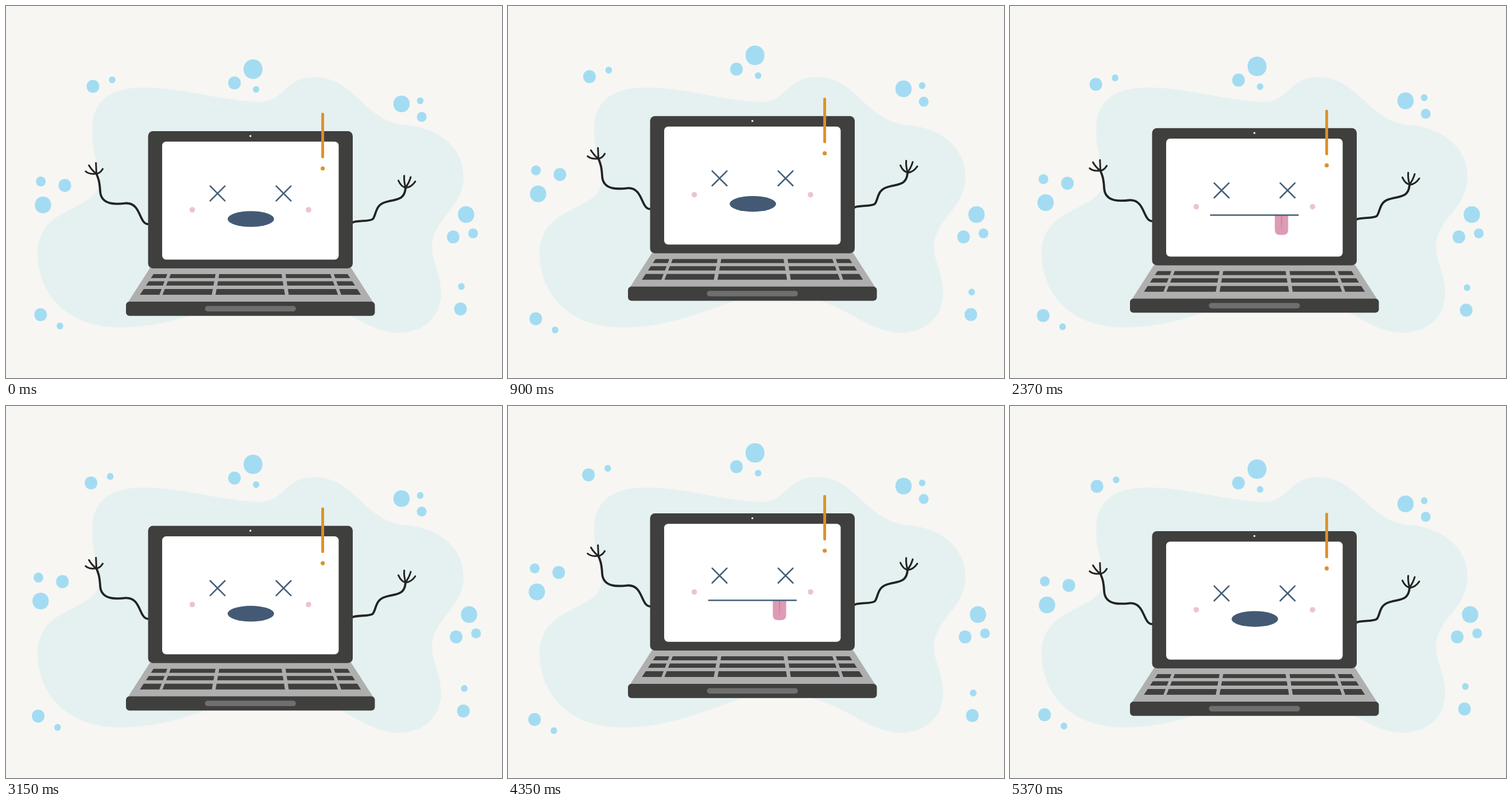
Write an HTML page that moves like this. It is 864x648 px and loops after 5.4 s.

```html
<!DOCTYPE html>
<html lang="en">
<head>
<meta charset="utf-8">
<title>Dizzy laptop</title>
<style>
  html, body { margin: 0; width: 100%; height: 100%; overflow: hidden; background: #f7f6f3; }
  svg { display: block; width: 100vw; height: 100vh; }
  .line { fill: none; stroke-linecap: round; stroke-linejoin: round; }
</style>
</head>
<body>
<svg viewBox="0 0 864 648">
  <path fill="#e5f1f1" d="M240 142C308 142 378 166 442 167C487 167 483 124 537 124C606 124 620 195 690 207
    C745 209 796 240 797 298C797 352 742 372 742 420C742 445 758 465 758 502C758 540 728 569 684 569
    C615 569 580 500 460 500C395 500 315 560 200 560C95 560 55 490 55 432C55 342 163 362 163 302
    C163 275 150 260 150 215C150 165 182 142 240 142Z"/>
  <g id="bubbles" fill="#a3dcf2"></g>

  <g id="laptop">
    <g class="line" stroke="#232323" stroke-width="3.8">
      <path d="M248 380C231 380 236 343 209 343.5C196 345 165 349 164 322C163 306 161 300 157 291"/>
      <path d="M604 377C612 373 634 376 639 371C645 364 643 347 660 342C678 336 694 340 696 317"/>
      <path stroke-width="3" d="M157.5 292L156.7 273.5M157 292C152 288 147 282 144.5 277.5
        M138.7 288C144 293 150 293 157 292C162 292 166 288 168.5 283.7"/>
      <path stroke-width="3" d="M696 316C694 309 693 302 693.7 295.7M696 316C700 311 703 305 705 298
        M683.5 304C687 312 692 316 697 316.5C704 316 710 310 713 305.7"/>
    </g>

    <path fill="#afafaf" d="M251 456H601L639.5 516H212.5Z"/>
    <rect x="247.5" y="218" width="356.5" height="239" rx="8.5" fill="#3f3f3d"/>
    <rect x="272" y="236.3" width="307.5" height="205.5" rx="7" fill="#fff"/>
    <circle cx="425.7" cy="226.5" r="1.7" fill="#fff"/>
    <path id="keys" fill="#3f3f3d"/>
    <rect x="209" y="515" width="433.5" height="24.7" rx="6" fill="#3f3f3d"/>
    <rect x="346.5" y="522.5" width="158.5" height="9.5" rx="4.7" fill="#6f6f6f"/>

    <path class="line" stroke="#445f7a" stroke-width="2.6"
      d="M355.7 313.7l25.6 25.6m0-25.6l-25.6 25.6M470.7 313.7l25.6 25.6m0-25.6l-25.6 25.6"/>
    <g fill="#eac4d1">
      <circle cx="324.5" cy="355" r="4.8"/>
      <circle cx="527" cy="355" r="4.8"/>
    </g>
    <ellipse id="openMouth" cx="426.5" cy="371" rx="40.5" ry="13.7" fill="#445a74"/>
    <g id="tongueMouth">
      <path fill="#dd9bb5" d="M461.3 369.6H484.5V395Q484.5 404 475.5 404H470.3Q461.3 404 461.3 395Z"/>
      <path fill="#cf7f9f" d="M471.8 370H474.2L473.3 397H472.7Z"/>
      <path class="line" stroke="#445f7a" stroke-width="2.5" d="M349.7 369.6H501.8"/>
    </g>
    <g fill="#dd9128">
      <rect x="549.2" y="186" width="4.9" height="79.3" rx="2.2"/>
      <circle cx="551.7" cy="283" r="3.6"/>
    </g>
  </g>
</svg>
<script>
const HALF = 1350, PERIOD = 2 * HALF, LOOP = 2 * PERIOD, STEP = 30;
const LIFT = -35.5;
const byId = id => document.getElementById(id);
const laptop = byId("laptop"), openMouth = byId("openMouth"), tongueMouth = byId("tongueMouth");

// Each group drifts by `shift`; dots are [x, y, radius].
const groups = [
  { shift: [-12.9, -22.9], dots: [[151.5, 140, 11], [185, 128.6, 5.7]] },
  { shift: [0, -32.4], dots: [[430.3, 110, 16.5], [398, 134, 11], [435.7, 145.3, 5.6]] },
  { shift: [0, LIFT], dots: [[689, 170.5, 14.2], [721.5, 165, 5.7], [724.2, 193, 8.4]] },
  { shift: [-16.2, -25.9], dots: [[60.7, 305.5, 8.4], [102.5, 312.6, 11], [64.5, 346.5, 14.2]] },
  { shift: [-16.1, 9.4], dots: [[60.3, 537.8, 11], [94, 557.4, 5.7]] },
  { shift: [19.7, 0], dots: [[801.5, 363.2, 14.2], [779, 402.3, 11], [813.7, 396, 8.4]] },
  { shift: [19.7, 13], dots: [[793.2, 488.6, 5.7], [791.7, 527.8, 11]] }
];

// A slightly squarish, slightly tall disc.
function bubblePath([x, y, r]) {
  const h = r * 1.025, a = r * 0.58, b = h * 0.58;
  return `M${x} ${y - h}C${x + a} ${y - h} ${x + r} ${y - b} ${x + r} ${y}` +
    `S${x + a} ${y + h} ${x} ${y + h}S${x - r} ${y + b} ${x - r} ${y}S${x - a} ${y - h} ${x} ${y - h}Z`;
}

for (const group of groups) {
  group.node = document.createElementNS("http://www.w3.org/2000/svg", "path");
  group.node.setAttribute("d", group.dots.map(bubblePath).join(""));
  byId("bubbles").append(group.node);
}

// Key columns: [left, right] at the top edge, then at the bottom edge.
const columns = [
  [257, 281, 233.3, 267.3], [287, 365, 272.5, 358.5], [371.5, 480, 365, 486],
  [487, 565, 492.5, 578.3], [571, 595, 584, 618.3]
];
const rows = [[467, 474], [479.5, 487], [493, 503]];

function keyPath([l0, r0, l1, r1], [top, bottom]) {
  const at = (from, to, y) => from + (to - from) * (y - 467) / 36;
  return `M${at(l0, l1, top)} ${top}L${at(r0, r1, top)} ${top}` +
    `L${at(r0, r1, bottom)} ${bottom}L${at(l0, l1, bottom)} ${bottom}Z`;
}
byId("keys").setAttribute("d", rows.flatMap(row => columns.map(col => keyPath(col, row))).join(""));

const move = (node, x, y) => node.setAttribute("transform", `translate(${x} ${y})`);

function render(time) {
  const t = time % PERIOD;
  const s = 1 - Math.abs(t - HALF) / HALF;
  const p = s * s * (3 - 2 * s);
  move(laptop, 0, LIFT * p);
  for (const { node, shift: [x, y] } of groups) move(node, x * p, y * p);

  const tongue = t >= HALF && t < PERIOD - STEP;
  openMouth.style.display = tongue ? "none" : "";
  tongueMouth.style.display = tongue ? "" : "none";
}

const start = performance.now();
function tick() {
  const elapsed = (performance.now() - start) % LOOP;
  render(Math.floor(elapsed / STEP) * STEP);
  requestAnimationFrame(tick);
}
tick();
</script>
</body>
</html>
```
